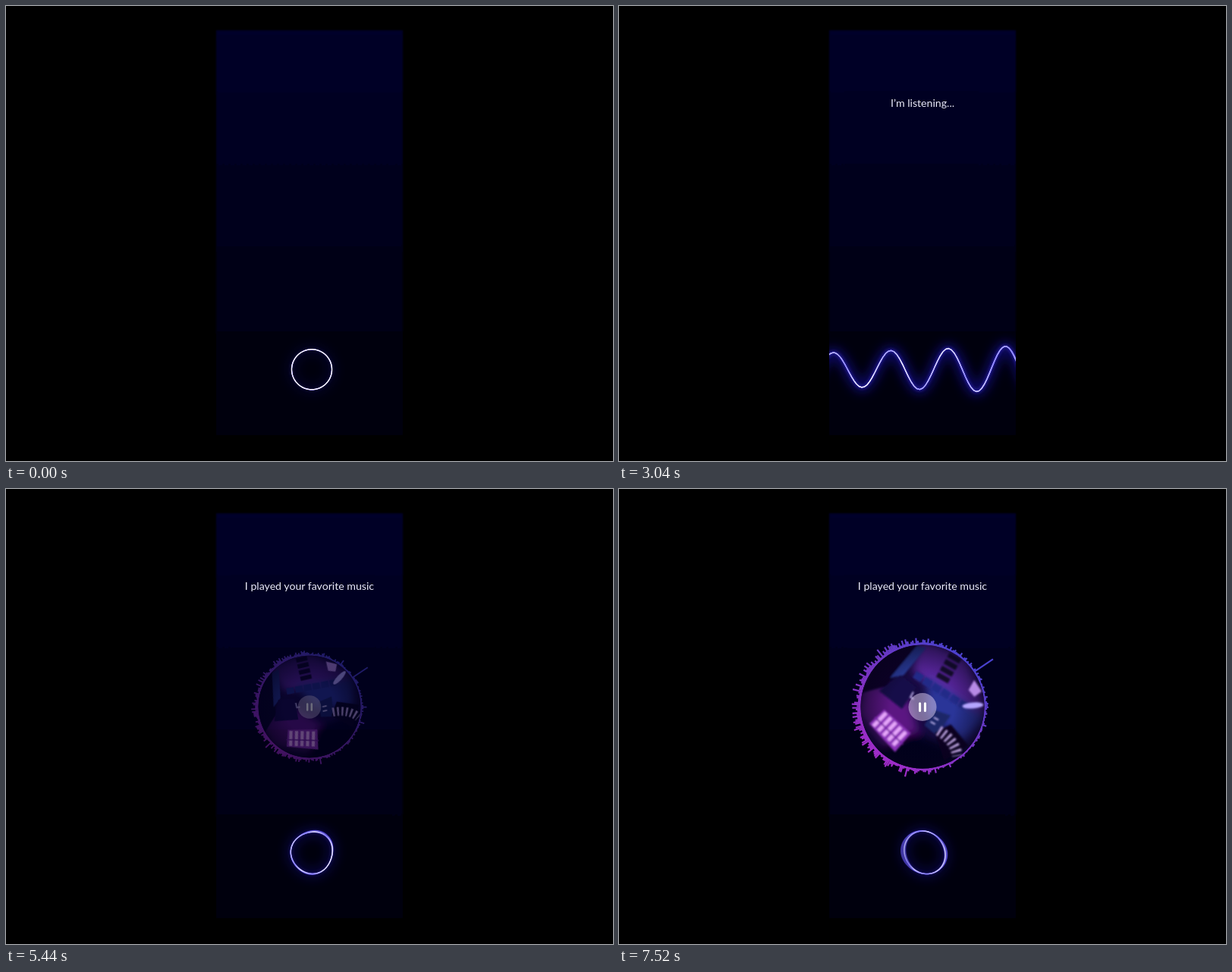
An HTML page for the animation above (7.56 s loop, 800x600 px).

```html
<!DOCTYPE html>
<html lang="en">
<head>
<meta charset="utf-8">
<title>Voice assistant</title>
<style>
  html, body { margin: 0; width: 100%; height: 100%; overflow: hidden; background: #000; }
  svg { display: block; width: 800px; height: 600px; }
  text { font: 14.15px Lato, "Open Sans", sans-serif; fill: #ebebf7; white-space: pre; }
  .mid { text-anchor: middle; }
  .title { font-size: 29.3px; font-weight: 700; fill: #fff; }
</style>
</head>
<body>
<svg viewBox="0 0 800 600">
  <defs>
    <linearGradient id="night" x2="0" y2="1">
      <stop stop-color="#000029"/>
      <stop offset=".5" stop-color="#00001b"/>
      <stop offset="1" stop-color="#000008"/>
    </linearGradient>
    <linearGradient id="lineTone" x2="1" y2=".35">
      <stop stop-color="#fff"/>
      <stop class="tint" offset=".33"/>
      <stop offset=".5" stop-color="#fff"/>
      <stop class="tint" offset=".78"/>
      <stop offset="1" stop-color="#fff"/>
    </linearGradient>
    <linearGradient id="ringTone" gradientUnits="userSpaceOnUse" x1="-55" y1="70" x2="55" y2="-70">
      <stop stop-color="#a02cc8"/>
      <stop offset=".55" stop-color="#7036c2"/>
      <stop offset="1" stop-color="#4a42cf"/>
    </linearGradient>
    <radialGradient id="shade">
      <stop offset=".5" stop-color="#05021a" stop-opacity="0"/>
      <stop offset="1" stop-color="#05021a" stop-opacity=".6"/>
    </radialGradient>
    <filter id="glow" filterUnits="userSpaceOnUse" x="200" y="380" width="400" height="200"><feGaussianBlur stdDeviation="8"/></filter>
    <filter id="halo" filterUnits="userSpaceOnUse" x="200" y="380" width="400" height="200"><feGaussianBlur stdDeviation="2"/></filter>
    <filter id="soft" x="-50%" y="-50%" width="200%" height="200%"><feGaussianBlur stdDeviation="6"/></filter>
    <filter id="fine" x="-30%" y="-30%" width="160%" height="160%"><feGaussianBlur stdDeviation=".9"/></filter>
    <filter id="edge"><feGaussianBlur stdDeviation=".8"/></filter>
    <clipPath id="panelClip"><rect x="277" y="32" width="246" height="534"/></clipPath>
    <clipPath id="discClip"><circle r="81.5"/></clipPath>
  </defs>

  <rect width="800" height="600"/>
  <rect x="277" y="32" width="246" height="534" fill="url(#night)" filter="url(#edge)"/>

  <text id="title" class="mid title" x="400" y="142.5">Morning</text>
  <text id="question" class="mid" x="400" y="174.3">What can I do for you ?</text>
  <text id="listening" class="mid" x="400" y="132.7">I’m listening...</text>
  <text id="command" x="297" y="232.6"></text>
  <text id="answer" class="mid" x="400" y="132.7">I played your favorite music</text>

  <g id="player">
    <path id="bars" fill="none" stroke="url(#ringTone)" stroke-width="2.2"/>
    <circle r="82.3" fill="none" stroke="url(#ringTone)" stroke-width="2"/>
    <g clip-path="url(#discClip)">
      <g id="picture">
        <circle r="84" fill="#160a40"/>
        <g filter="url(#soft)">
          <path d="M-50-80L20-85L75-40L70-10L-35-35Z" fill="#5a289e"/>
          <path d="M-15-38L80-30L70 15L10 5Z" fill="#2a3498"/>
          <path d="M-85 5L-20 0L15 35L-5 75L-70 50Z" fill="#5c1282"/>
          <path d="M5 35L85 25L40 90L-30 85Z" fill="#06031a"/>
        </g>
        <g filter="url(#fine)">
          <path d="M-82-35L-45-70L-55 0L-80 25Z" fill="#0a0628"/>
          <path d="M-46-66L-34-70L-42-24L-56-12Z" fill="#2b3c9c"/>
          <path d="M-46-22L-20-18L-22 16L-60 10Z" fill="#180c4a"/>
          <path d="M5-80V-40" stroke="#12072f" stroke-width="18" stroke-dasharray="7 3"/>
          <path d="M-30-32L50-28" stroke="#222c88" stroke-width="10" stroke-dasharray="12 2"/>
          <path d="M16-4L38-8L34 24L14 20Z" fill="#1b2568"/>
          <path d="M31 22L44 2L78 15L60 48Z" fill="#0a0522"/>
        </g>
        <circle r="84" fill="url(#shade)"/>
        <g filter="url(#fine)">
          <path d="M42-64L58-56L53-45L42-49Z" fill="#b78ae6"/>
          <ellipse cx="57" cy="-34" rx="14" ry="4" transform="rotate(-34 57 -34)" fill="#b5a6ff"/>
          <path d="M34 17Q60 18 72 34" fill="none" stroke="#b9a0dc" stroke-width="14" stroke-dasharray="3 4"/>
          <path d="M-42 28L4 38L-2 70L-50 54Z" fill="#8a30b8"/>
          <path d="M-43 42L0 53" stroke="#e6a6fa" stroke-width="24" stroke-dasharray="5 4"/>
          <path d="M-48 43L2 56" stroke="#7020a0" stroke-width="2"/>
          <path d="M-20-11v8h5M20 5h7M19 12h7" fill="none" stroke="#bdb2ea" stroke-width="2"/>
        </g>
      </g>
    </g>
    <circle r="18.5" cy=".5" fill="#d8c9ee" fill-opacity=".52"/>
    <path d="M-3.4-4.2v9.6M3.4-4.2v9.6" stroke="#fff" stroke-width="3" stroke-linecap="round"/>
  </g>

  <g clip-path="url(#panelClip)" fill="none" stroke-linejoin="round">
    <path id="aura" stroke="#261cff" stroke-width="9" filter="url(#glow)"/>
    <path id="rim" stroke="#4a3cff" stroke-width="3" filter="url(#halo)"/>
    <path id="echoes" stroke="#7264ff" stroke-width=".8" stroke-opacity=".6"/>
    <path id="line" stroke="url(#lineTone)" stroke-width="1.5"/>
  </g>
</svg>

<script>
const LOOP = 7560, STEP = 40, TAU = Math.PI * 2, RAD = Math.PI / 180;
const $ = id => document.getElementById(id);
const span = (t, a, b) => Math.max(0, Math.min(1, (t - a) / (b - a)));
const smooth = (t, a, b) => { const p = span(t, a, b); return p * p * (3 - 2 * p); };
const easeOut = p => 1 - (1 - p) ** 3;
const mix = (a, b, p) => a + (b - a) * p;
const set = (id, attrs) => { for (const k in attrs) $(id).setAttribute(k, attrs[k]); };

// The ring stretches into a flat wave while listening, then springs back
function voiceState(t) {
  const alive = smooth(t, 0, 900);
  const stretch = smooth(t, 2180, 2700) * (1 - smooth(t, 4494, 4835));
  const flat = smooth(stretch, .3, 1);
  const swing = Math.cos(Math.PI * (t - 1240) / 3140) ** 2;
  const bounce = smooth(t, 4494, 4700) * (1 - smooth(t, 4750, 5400));
  const calm = alive * (1 - stretch);
  const radius = 26.5 + alive;
  return {
    cx: 403 + 3.5 * Math.sin(Math.PI * t / 3720) ** 2 * (1 - smooth(t, 4700, 5600)),
    rx: radius * (182 / radius) ** stretch,
    ry: (radius + 3 * bounce + 4 * stretch) * (1 - flat),
    wave: flat * (30 - 7 * Math.cos(TAU * (t - 3720) / 820)),
    crest: -.138 + (t - 2400) * .000469,
    oval: calm * .06 * swing,
    three: calm * (.035 * (1 - swing) + .05 * bounce),
    four: .075 * bounce,
    echo: alive * (.06 + .15 * swing) * (1 - .75 * flat),
    alive, stretch, t
  };
}

function outline(s, spread) {
  const count = 300, points = [];
  // Lobes turn at a steady rate and point along deg at the given time
  const lobe = (n, angle, deg, rate, at) => Math.cos(n * (angle - (deg + (s.t - at) * rate) * RAD));
  for (let i = 0; i < count; i++) {
    const a = i / count * TAU, u = Math.cos(a);
    const near = lobe(1, a, 165, .117, 1240);
    const bulge = ((1 + near) / 2) ** 4 + .6 * ((1 - near) / 2) ** 5;
    const r = 1 + s.oval * lobe(2, a, 86, .0524, 1240)
      + s.three * lobe(3, a, 50, .033, 4720)
      + s.four * lobe(4, a, 24, .03, 4720)
      + s.echo * spread * bulge;
    const x = s.cx + s.rx * r * u;
    const y = 479.3 + s.ry * r * Math.sin(a) - s.wave * (1 + .25 * u) * Math.cos(TAU * (u - s.crest) / .415);
    points.push(x.toFixed(2) + " " + y.toFixed(2));
  }
  return "M" + points.join("L") + "Z";
}

function drawVoice(t) {
  const s = voiceState(t), main = outline(s, 0);
  const glow = .2 + .2 * s.alive + .45 * s.stretch;
  let echoes = "";
  for (let i = -3; i <= 7; i++) echoes += outline(s, i / 9);
  set("line", { d: main, opacity: 1 - 1.5 * s.echo });
  set("echoes", { d: echoes });
  set("rim", { d: main, opacity: glow * .7 });
  set("aura", { d: main, opacity: glow * .65 });
  const v = Math.round(255 - 105 * s.alive);
  document.querySelectorAll(".tint").forEach(e => e.setAttribute("stop-color", `rgb(${v},${v - 6},255)`));
}

// Text rises into place, then leaves upwards
function drawText(id, t, inAt, inEnd, outAt = LOOP, outEnd = LOOP + 1) {
  const enter = easeOut(span(t, inAt, inEnd)), leave = span(t, outAt, outEnd);
  set(id, {
    opacity: enter * (1 - leave),
    transform: `translate(0 ${20 * (1 - enter) - 20 * leave ** 2})`
  });
}

const letters = [..."Play music"].map(ch => {
  const e = document.createElementNS("http://www.w3.org/2000/svg", "tspan");
  e.textContent = ch;
  return $("command").appendChild(e);
});

function drawTexts(t) {
  drawText("title", t, 160, 720, 2320, 2560);
  drawText("question", t, 720, 1280, 2320, 2560);
  drawText("listening", t, 2600, 3000, 4300, 4540);
  drawText("answer", t, 4480, 4710);
  letters.forEach((e, i) => e.setAttribute("fill-opacity", span(t, 3100 + i * 64, 3200 + i * 64)));
  set("command", { opacity: 1 - span(t, 4300, 4540) });
}

const hash = (a, b) => {
  const v = Math.sin(a * 127.1 + b * 311.7) * 43758.5453;
  return v - Math.floor(v);
};

// Spectrum around the disc: a noisy fringe, a few tall notes and one steady peak
function spectrum(t) {
  const count = 240, beat = Math.floor(t / 80), part = t / 80 - beat;
  const loud = Math.sin(Math.PI * (t - 6080) / 960) ** 2;
  let d = "";
  for (let i = 0; i < count; i++) {
    const deg = i * 360 / count - 34, c = Math.cos(deg * RAD), s = Math.sin(deg * RAD);
    const noise = mix(hash(i, beat), hash(i, beat + 1), part);
    const reach = Math.max(.15, Math.sin((deg - 40) / 286 * Math.PI));
    let h = .3 + 2 * noise ** 2 + loud * reach * (1.5 + 9 * noise ** 1.5);
    if (hash(i, 7) > .965) h += (1 - .8 * loud) * (5 + 14 * hash(i, 3));
    if (i === 0) h = 29;
    const r = 83 + h;
    d += `M${(82 * c).toFixed(1)} ${(82 * s).toFixed(1)}L${(r * c).toFixed(1)} ${(r * s).toFixed(1)}`;
  }
  return d;
}

function drawPlayer(t) {
  const show = easeOut(span(t, 5360, 5840));
  set("player", { opacity: show, transform: `translate(400 287) scale(${mix(.7, 1, show)})` });
  set("picture", { transform: `rotate(${(t - 6080) * .0205})` });
  set("bars", { d: spectrum(t) });
}

function frame() {
  const t = Math.floor(performance.now() / STEP) * STEP % LOOP;
  drawTexts(t);
  drawPlayer(t);
  drawVoice(t);
  requestAnimationFrame(frame);
}
frame();
</script>
</body>
</html>
```
